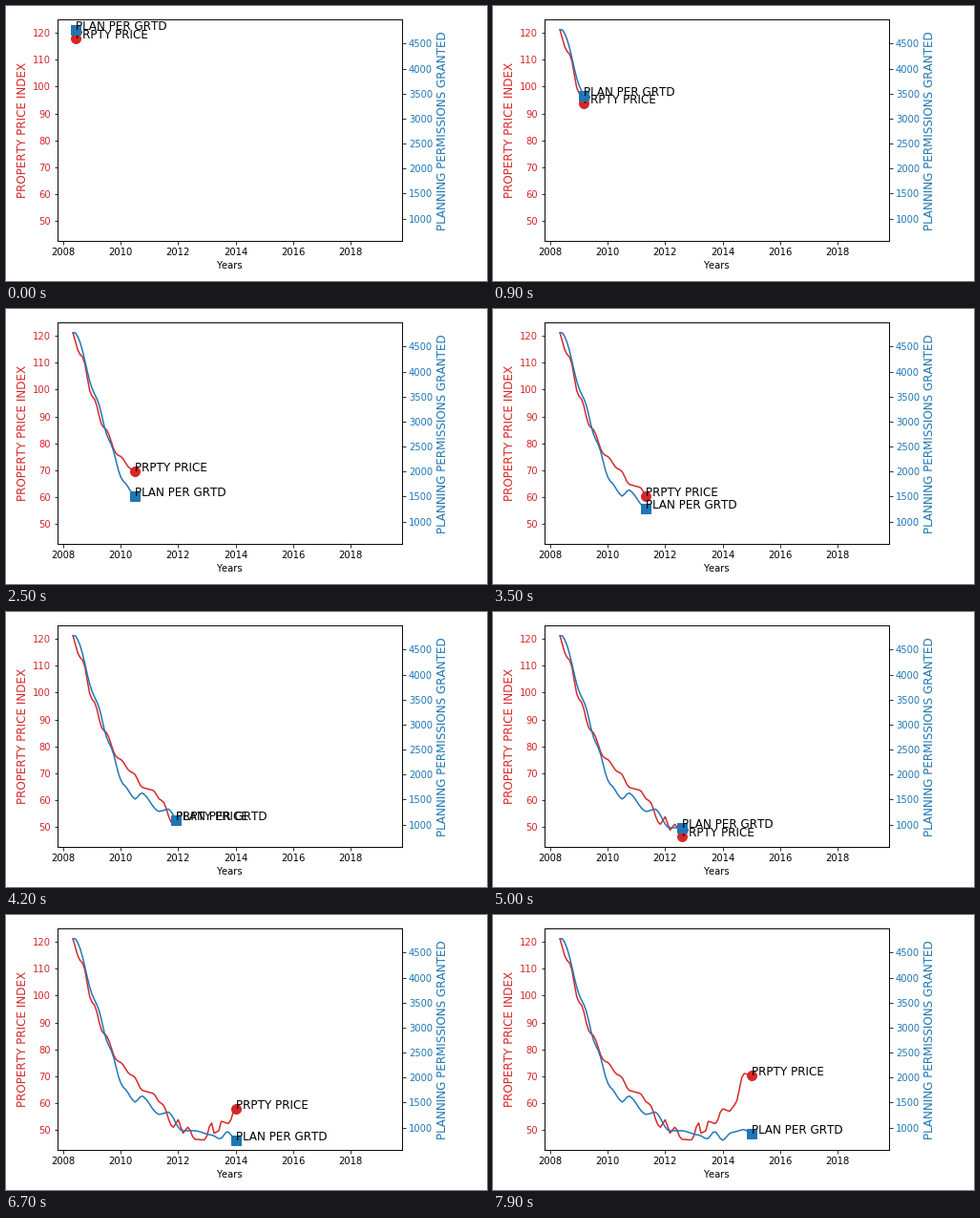
A matplotlib script for the animation above (8 s loop, 504 px wide and 288 px high).

```python
import numpy as np
import matplotlib.pyplot as plt
from matplotlib.animation import FuncAnimation

W, H, DPI = 504, 288, 72
LEFT, RIGHT, TOP, BOTTOM = 53.75, 414.85, 14.2, 246.2
FRAMES, STEP_MS = 80, 100
START, END = 2008 + 1 / 3, 2019.25

plt.rcParams.update({"font.family": "DejaVu Sans", "font.size": 10,
                     "text.kerning_factor": 6})

# Turning points as {month: value}; the curves ease from one to the next.
PRICE = {-1.6: 123.3, 3.6: 112.6, 8.2: 97.3, 13: 85.8, 19: 75.5, 24.8: 70.3,
         29.5: 64.5, 33: 63.8, 37: 59.9, 42: 51, 44: 53.8, 46: 48.8, 48: 51,
         51: 46.5, 55: 46.3, 58: 52.6, 59: 48.8, 61: 49.7, 62: 53.2,
         65: 52.4, 68: 57.8, 71: 57, 73: 59.3, 77: 71, 80: 70.3}
PERMITS = {1.2: 4777, 9.5: 3506, 15.2: 2617, 20.8: 1814, 26: 1508, 28.8: 1636,
           35.8: 1259, 40: 1307, 45.4: 934, 51: 935, 58: 848, 61.6: 768,
           64.6: 925, 68: 744, 71.6: 897, 77: 958, 80: 878}

months = np.arange(FRAMES + 1)
years = START + months / 12


def eased(points, ease):
    """Monthly values between turning points, slowing down near each one."""
    x, y = np.array(list(points.items())).T
    pos = np.interp(months, x, np.arange(len(x)))
    pos -= ease * np.sin(2 * np.pi * pos) / (2 * np.pi)
    return np.interp(pos, np.arange(len(y)), y)


def style_axis(ax, label, color, limits, ticks):
    ax.set_yticks(ticks)
    ax.set_ylim(*limits)
    ax.set_ylabel(label, color=color, fontsize=12)
    ax.tick_params(axis="y", labelcolor=color)


def make_series(ax, values, color, marker, name):
    line, = ax.plot([], [], color=color, lw=1.5)
    head, = ax.plot([], [], color=color, marker=marker, ms=10, ls="none")
    text = ax.text(years[0], values[0], name, fontsize=12, color="black")
    return values, line, head, text


fig = plt.figure(figsize=(W / DPI, H / DPI), dpi=DPI, facecolor="white")
ax = fig.add_axes([LEFT / W, 1 - BOTTOM / H,
                   (RIGHT - LEFT) / W, (BOTTOM - TOP) / H])
twin = ax.twinx()
margin = 0.05 * (END - START)
ax.set_xlim(START - margin, END + margin)
ax.set_xticks(range(2008, 2020, 2))
ax.set_xlabel("Years")

style_axis(ax, "PROPERTY PRICE INDEX", "tab:red",
           (42.505, 124.935), range(50, 121, 10))
style_axis(twin, "PLANNING PERMISSIONS GRANTED", "tab:blue",
           (547, 4981.7), range(1000, 4501, 500))

series = [
    make_series(ax, eased(PRICE, 0.7), "tab:red", "o", "PRPTY PRICE"),
    make_series(twin, eased(PERMITS, 0.4), "tab:blue", "s", "PLAN PER GRTD"),
]


def update(frame):
    now = frame + 1
    artists = []
    for values, line, head, text in series:
        line.set_data(years[:now + 1], values[:now + 1])
        head.set_data([years[now]], [values[now]])
        text.set_position((years[now], values[now]))
        artists += [line, head, text]
    return artists


anim = FuncAnimation(fig, update, frames=FRAMES, interval=STEP_MS,
                     init_func=lambda: update(0), repeat=True,
                     repeat_delay=0, blit=False)
plt.show()
```
